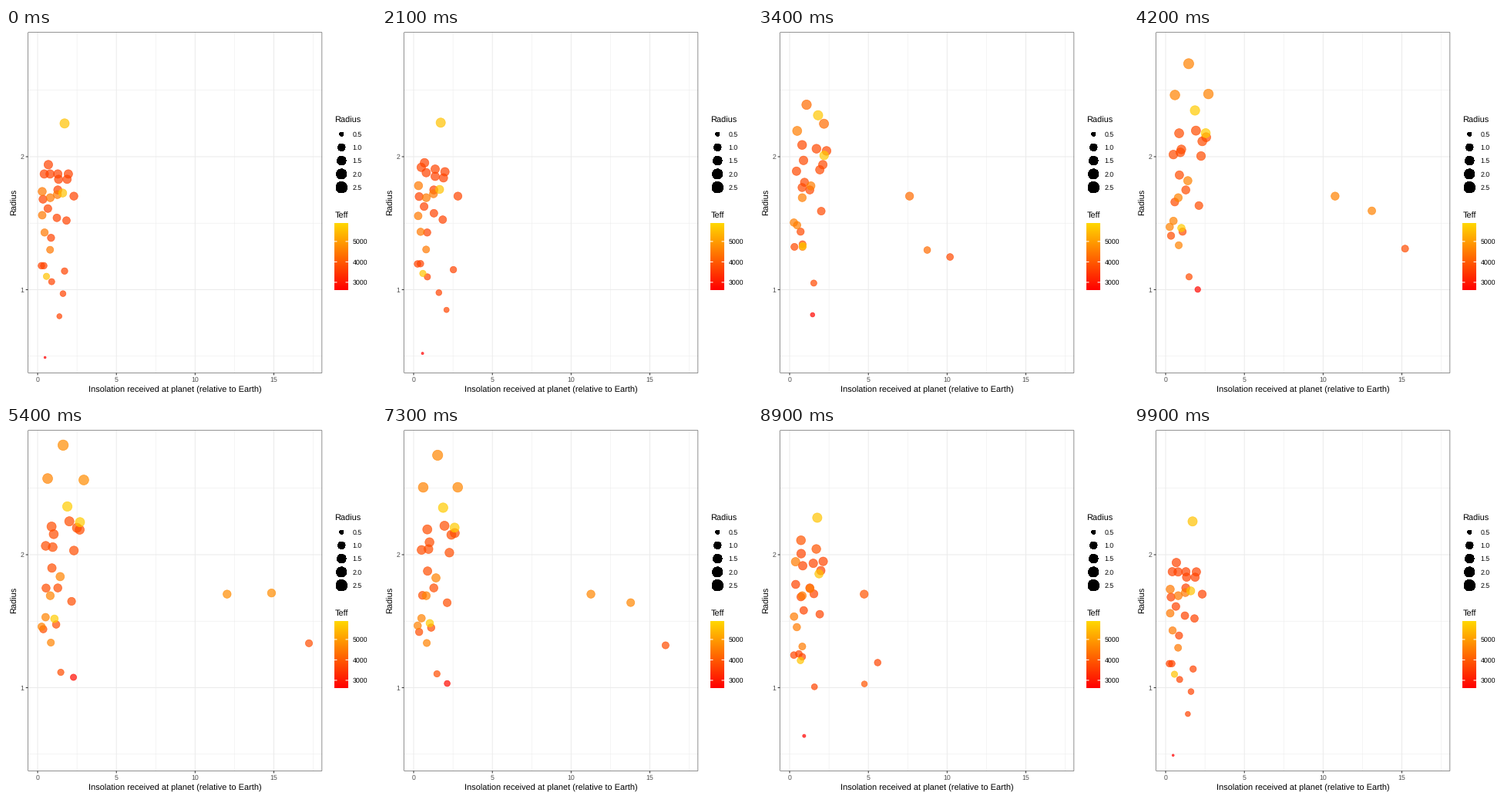
Animation of 480x480 px, one loop 10000 ms. Source, as a matplotlib script:

```python
import numpy as np
import matplotlib.pyplot as plt
from matplotlib.animation import FuncAnimation
from matplotlib.patches import Rectangle

SIZE, DPI = 480, 72          # at 72 dpi one point is one pixel
FRAMES, INTERVAL = 100, 100
LEFT, RIGHT, TOP, BOTTOM = 28.45, 410.15, 5.5, 447.6
LINE = 1.067
DARK, GRID = "#333333", "#EBEBEB"
KEY = 17.28                  # legend key size
KEY_X = 426.65
LABEL_X = 449.4
BAR = (426, 444, 340, 253)   # left, right, bottom, top

plt.rcParams.update({
    "font.family": "Liberation Sans",
    "text.hinting": "none",
    "path.snap": False,
})


def make_planets():
    """Low and high estimates as rows of insolation, radius, temperature.

    Planets are ranked by radius. A star larger by a factor g makes the
    planet larger by g and its insolation by g squared.
    """
    x = np.array([1.71, .68, .42, .79, 1.28, 1.95, 1.33, 1.87, 1.28, .29,
                  1.59, 1.25, 2.3, .8, .34, .65, .29, 1.22, 1.83, .44,
                  .85, .79, .24, .39, 1.71, .56, .89, 1.61, 1.38, .47])
    g = np.array([1.05, 1.14, 1.51, 1.1, 1.37, 1.17, 1.23, 1.11, 1, 1.48,
                  1.3, 1.07, 1, 1, 1.23, 1.18, .935, 1.43, 1.085, 1.07,
                  1.55, 1.03, 1.22, 1.25, 1.17, 1.38, 1.65, 1.15, 2.14, 2.2])
    rank = np.arange(len(x))
    r = np.interp(rank,
                  [0, 1, 2, 5, 6, 7, 8, 14, 15, 16, 18, 19, 20, 21,
                   22, 23, 26, 27, 28, 29],
                  [2.25, 1.94, 1.87, 1.87, 1.83, 1.83, 1.75, 1.68, 1.61, 1.56,
                   1.52, 1.43, 1.39, 1.3, 1.18, 1.18, 1.06, .97, .8, .49])

    # Extra brightness from the star's temperature or the orbit
    boost = np.ones(len(x))
    for i, b in {2: 1.69, 4: 1.22, 12: 5.23, 20: .5, 23: 1.93,
                 24: 7.36, 26: .22, 27: .69, 28: 2.35}.items():
        boost[i] = b

    t = np.full(len(x), .31)
    t[[9, 11, 13, 16, 19, 21]] = .56
    t[[0, 10, 25]] = .9
    t[-1] = 0
    warming = np.full(len(x), .05)
    warming[[2, 4, 12, 28]] = .34

    order = np.argsort(t, kind="stable")
    low = np.column_stack([x, r, t])[order]
    high = np.column_stack([x * g**2 * boost, r * g, t + warming])[order]
    return low, high


LOW, HIGH = make_planets()
R_MIN, R_MAX = LOW[:, 1].min(), HIGH[:, 1].max()


def px(x):
    return 41.05 + 20.43 * np.asarray(x)


def py(r):
    return 166.95 - 172.5 * (np.asarray(r) - 2)


def heat(t):
    """Red to gold."""
    t = np.asarray(t, float)
    return np.stack([np.ones_like(t), t * 215 / 255, np.zeros_like(t)], axis=-1)


def size_of(r):
    r = np.asarray(r, float)
    return 1 + 5 * np.sqrt(np.clip((r - R_MIN) / (R_MAX - R_MIN), 0, 1))


def area(size):
    """Marker area for a point size given in millimetres."""
    return (.75 * (size * 2.845 + .945)) ** 2


def line(x, y, color, width, z):
    ax.plot(x, y, color=color, lw=width, zorder=z,
            solid_capstyle="butt", snap=False)


def text(x, y, s, size=8.8, color="black", ha="left", **kw):
    ax.text(x, y, s, size=size, color=color, ha=ha, va="baseline", **kw)


def draw_panel():
    for x in np.arange(2.5, 18, 5):
        line([px(x)] * 2, [TOP, BOTTOM], GRID, LINE / 2, 1)
    for r in (.5, 1.5, 2.5):
        line([LEFT, RIGHT], [py(r)] * 2, GRID, LINE / 2, 1)
    for x in range(0, 16, 5):
        line([px(x)] * 2, [TOP, BOTTOM], GRID, LINE, 2)
        line([px(x)] * 2, [BOTTOM, BOTTOM + 2.75], DARK, LINE, 5)
        text(px(x), 458.8, str(x), color="#4D4D4D", ha="center")
    for r in (1, 2):
        line([LEFT, RIGHT], [py(r)] * 2, GRID, LINE, 2)
        line([LEFT - 2.75, LEFT], [py(r)] * 2, DARK, LINE, 5)
        text(23.5, py(r) + 3.15, str(r), color="#4D4D4D", ha="right")
    inset = LINE / 4
    ax.add_patch(Rectangle(
        (LEFT + inset, TOP + inset), RIGHT - LEFT - 2 * inset,
        BOTTOM - TOP - 2 * inset, fill=False, ec=DARK, lw=LINE / 2,
        zorder=6, snap=False))
    text((LEFT + RIGHT) / 2, 472.3,
         "Insolation received at planet (relative to Earth)", 11, ha="center")
    text(13.8, (TOP + BOTTOM) / 2 - .6, "Radius", 11, ha="center",
         rotation=90, rotation_mode="anchor")


def draw_legends():
    text(KEY_X - .5, 122.8, "Radius", 11)
    radii = np.arange(.5, 2.6, .5)
    ys = 137.6 + KEY * np.arange(5)
    ax.scatter([KEY_X + KEY / 2] * 5, ys, s=area(size_of(radii)),
               c="black", lw=1.6, zorder=4, antialiased=False)
    for r, y in zip(radii, ys):
        text(LABEL_X, y + 3.15, f"{r:.1f}")

    text(KEY_X - .2, 247.3, "Teff", 11)
    ax.imshow(heat(np.linspace(1, 0, 87))[:, None], aspect="auto", zorder=3,
              extent=BAR, interpolation="nearest")
    left, right = BAR[:2]
    for teff in (3000, 4000, 5000):
        y = 329.9 - .0265 * (teff - 3000)
        line([left, left + KEY / 5], [y, y], "white", LINE, 4)
        line([right - KEY / 5, right], [y, y], "white", LINE, 4)
        text(LABEL_X, y + 3.15, str(teff))


def progress(i):
    """Share of the way from LOW to HIGH, resting at both ends."""
    u = np.interp(i, [16, 50, 67, 100], [0, 1, 1, 0])
    return (1 - np.cos(np.pi * u)) / 2


def update(i):
    p = progress(i)
    x, r, t = (LOW + (HIGH - LOW) * p).T
    size = size_of(LOW[:, 1]) * (1 - p) + size_of(HIGH[:, 1]) * p
    colors = np.column_stack([heat(t), np.full(len(t), .7)])
    dots.set_offsets(np.column_stack([px(x), py(r)]))
    dots.set_sizes(area(size))
    dots.set_facecolor(colors)
    dots.set_edgecolor(colors)
    return dots,


fig = plt.figure(figsize=(SIZE / DPI, SIZE / DPI), dpi=DPI, facecolor="white")
ax = fig.add_axes([0, 0, 1, 1])
ax.axis("off")
draw_panel()
draw_legends()
dots = ax.scatter(px(LOW[:, 0]), py(LOW[:, 1]), lw=.709, zorder=4)
ax.set(xlim=(0, SIZE), ylim=(SIZE, 0))
update(0)

anim = FuncAnimation(fig, update, frames=FRAMES, interval=INTERVAL,
                     repeat=True, repeat_delay=0)
plt.show()
```
